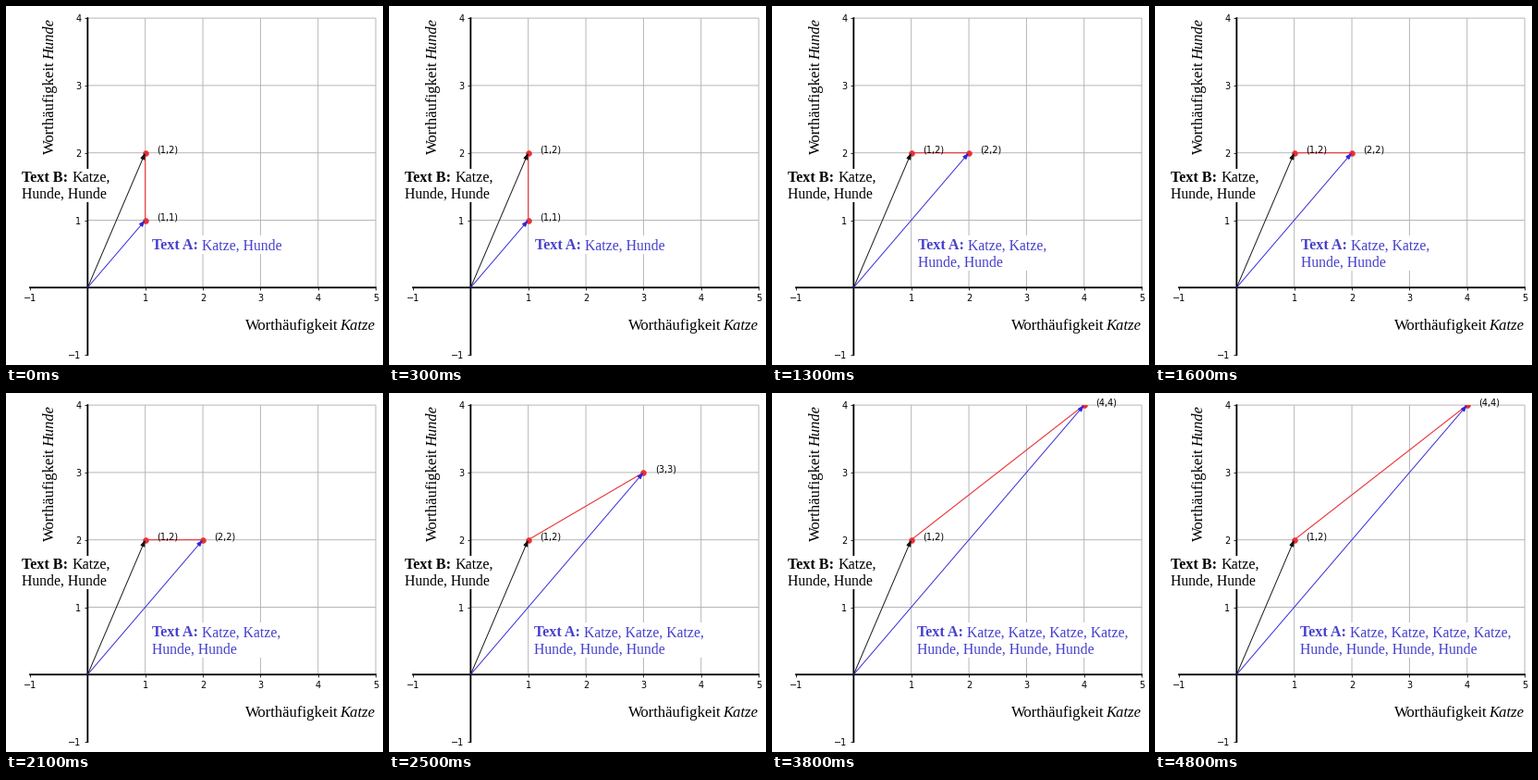
Write a matplotlib script that moves like this. It is 408 px wide and 388 px high and loops after 5000 ms.

```python
import matplotlib.pyplot as plt
from matplotlib.animation import FuncAnimation
from matplotlib.patches import FancyArrowPatch, Rectangle

W, H, DPI = 408, 388, 64
PX = 72 / DPI  # points per pixel
LEFT, TOP, PLOT_W, PLOT_H = 26, 13.1, 374.1, 364
RED, BLUE, TEXT_BLUE = "#ea3035", "#3026d8", "#4640cc"
TEXT_B = (1, 2)

# first tick of each stage, left edge of its text, right edge of its box
STAGES = [(0, 158, 302), (12, 158, 303), (25, 157, 347), (38, 157, 392)]

fig = plt.figure(figsize=(W / DPI, H / DPI), dpi=DPI, facecolor="white")
ax = fig.add_axes([LEFT / W, 1 - (TOP + PLOT_H) / H, PLOT_W / W, PLOT_H / H])
ax.set(xlim=(-1, 5), ylim=(-1, 4), xticks=[-1, 1, 2, 3, 4, 5],
       yticks=[-1, 1, 2, 3, 4])
ax.tick_params(labelsize=9.7 * PX, length=3.4 * PX, pad=3.4 * PX,
               width=0.8 * PX)
for side in ("left", "bottom"):
    ax.spines[side].set_position("zero")
    ax.spines[side].set_linewidth(1.8 * PX)
    ax.spines[side].set_snap(False)
for side in ("right", "top"):
    ax.spines[side].set_visible(False)
grid = dict(color="#b4b2b6", lw=0.95 * PX, clip_on=False, snap=False,
            zorder=0.5)
ax.vlines(range(1, 6), 0, 4, **grid)
ax.hlines(range(1, 5), 0, 5, **grid)

# overlay in pixel coordinates for the captions
page = fig.add_axes([0, 0, 1, 1], xlim=(0, W), ylim=(H, 0))
page.axis("off")


def caption(x, y, text="", size=15.8, **style):
    return page.text(x, y, text, family="Liberation Serif", size=size * PX,
                     va="baseline", rotation_mode="anchor", **style)


def white_box(x, y, width, height):
    return page.add_patch(Rectangle((x, y), width, height, fc="white", lw=0))


def arrow(color):
    return ax.add_patch(FancyArrowPatch(
        (0, 0), TEXT_B, arrowstyle="-|>,head_length=5.8,head_width=2.1",
        mutation_scale=PX, shrinkA=0, shrinkB=0, color=color, lw=0.95 * PX,
        joinstyle="miter", zorder=4))


def point_label(x, y):
    return ax.text(x + 0.2, y, f"({x},{y})", size=9.7 * PX, zorder=5)


caption(259, 350, "Worthäufigkeit", 16.7)
caption(361.5, 350, "Katze", 16.6, style="italic")
caption(52, 160.5, "Worthäufigkeit", 16.7, rotation=90)
caption(52, 57.5, "Hunde", 16.5, rotation=90, style="italic")

white_box(15, 176, 101, 36)
caption(17, 190, "Text B:", 16.1, weight="bold")
caption(71, 190, "Katze,", 16.1)
caption(17, 208, "Hunde, Hunde")

box_a = white_box(155, 248, 147, 20)
title_a = caption(158, 263.4, "Text A:", 16.1, weight="bold", color=TEXT_BLUE)
cats = caption(212, 263.4, color=TEXT_BLUE)
dogs = caption(158, 281.5, color=TEXT_BLUE)

link, = ax.plot([], [], color=RED, lw=1.1 * PX, snap=False, zorder=3)
dots, = ax.plot([], [], "o", color=RED, ms=6 * PX, mew=0.5 * PX, zorder=3)
arrow(color="#111111")
arrow_a = arrow(BLUE)
point_label(*TEXT_B)
label_a = point_label(1, 1)


def update(tick):
    n = sum(tick >= start for start, _, _ in STAGES)
    _, left, right = STAGES[n - 1]
    arrow_a.set_positions((0, 0), (n, n))
    for line in (link, dots):
        line.set_data([TEXT_B[0], n], [TEXT_B[1], n])
    label_a.set_position((n + 0.2, n))
    label_a.set_text(f"({n},{n})")

    title_a.set_x(left)
    cats.set_x(left + 53.8)
    dogs.set_x(left)
    if n == 1:
        cats.set_text("Katze, Hunde")
        dogs.set_text("")
    else:
        cats.set_text(" ".join(["Katze,"] * n))
        dogs.set_text(", ".join(["Hunde"] * n))
    box_a.set_width(right - 155)
    box_a.set_height(20 if n == 1 else 38)
    return arrow_a, link, dots, label_a, box_a, title_a, cats, dogs


anim = FuncAnimation(fig, update, frames=50, interval=100, repeat=True,
                     repeat_delay=0)
plt.show()
```
